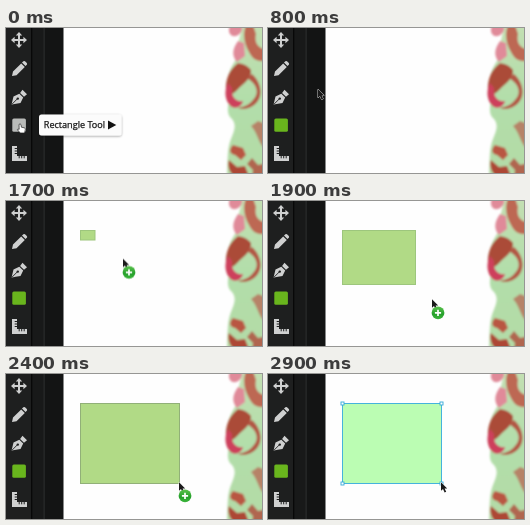
These frames come from a looping animation (256x145 px, 3.9 s). An HTML page:

```html
<!DOCTYPE html>
<html lang="en">
<head>
<meta charset="utf-8">
<title>Rectangle tool</title>
<style>
html, body { margin: 0; width: 100%; height: 100%; overflow: hidden; background: #fff; }
svg { display: block; width: 100vw; height: 100vh; }
text { font: 9.1px "Open Sans", "Noto Sans", sans-serif; fill: #161616; stroke: #161616; stroke-width: .25px; }

.swatch, .hover, .arrow, .badge, .shape, .selection {
  animation: 3.9s step-end infinite;
}
.swatch { animation-name: pick; }
.hover { animation-name: leave; }
.arrow { animation-name: move; }
.badge { animation-name: badge; }
.shape { animation-name: draw; x: 74.5px; y: 29.5px; }
.selection { animation-name: select; }

@keyframes pick {
  0% { fill: #b9bbb9; }
  7.69%, 100% { fill: #69b51d; }
}
@keyframes leave {
  0% { visibility: visible; }
  17.94%, 100% { visibility: hidden; }
}
/* pointer: toolbar, start corner, diagonal drag */
@keyframes move {
  0% { transform: translate(14px, 96px); visibility: hidden; }
  17.94% { transform: translate(27px, 84px); visibility: visible; }
  20.51% { transform: translate(50px, 61px); }
  23.07% { transform: translate(71px, 40px); }
  25.64% { transform: translate(81px, 30px); }
  28.2% { transform: translate(84px, 28px); animation-timing-function: steps(3); }
  35.89% { transform: translate(75px, 29px); }
  41.02% { transform: translate(89px, 38px); }
  43.58% { transform: translate(117px, 57.5px); }
  46.15% { transform: translate(146px, 82px); }
  48.71% { transform: translate(164px, 98px); }
  51.28% { transform: translate(171px, 104px); animation-timing-function: steps(2); }
  56.41%, 100% { transform: translate(173px, 108px); visibility: visible; }
}
@keyframes badge {
  0% { visibility: hidden; }
  38.46% { visibility: visible; }
  64.1%, 100% { visibility: hidden; }
}
@keyframes draw {
  0% { width: 0; height: 0; visibility: hidden; fill: #b1da86; stroke: #9dc67d; }
  43.58% { width: 14.5px; height: 9.5px; visibility: visible; }
  46.15% { width: 43px; height: 29px; }
  48.71% { width: 73px; height: 54px; }
  51.28% { width: 93.5px; height: 72px; stroke: #91b078; animation-timing-function: steps(2); }
  56.41% { width: 99px; height: 80px; fill: #b1da86; stroke: #91b078; }
  66.66%, 100% { width: 99px; height: 80px; visibility: visible; fill: #bbfdb3; stroke: #45b3dc; }
}
@keyframes select {
  0% { visibility: hidden; }
  66.66%, 100% { visibility: visible; }
}
</style>
</head>
<body>
<svg viewBox="0 0 256 145" preserveAspectRatio="none">
  <defs>
    <filter id="soft" x="-20%" y="-10%" width="140%" height="120%"><feGaussianBlur stdDeviation=".9"/></filter>
    <filter id="edge"><feGaussianBlur stdDeviation=".3"/></filter>
    <filter id="shadow" x="-10%" y="-30%" width="120%" height="170%">
      <feDropShadow dx="0" dy=".8" stdDeviation="1.2" flood-opacity=".4"/>
    </filter>
    <linearGradient id="cloth" x1="0" x2="0" y1="0" y2="1">
      <stop stop-color="#c3dfb2"/><stop offset=".5" stop-color="#b2deaa"/><stop offset="1" stop-color="#b4dba6"/>
    </linearGradient>
    <linearGradient id="green" x1="0" x2="0" y1="0" y2="1">
      <stop stop-color="#5cc24d"/><stop offset=".6" stop-color="#25a02b"/><stop offset="1" stop-color="#3db53c"/>
    </linearGradient>
  </defs>

  <rect width="256" height="145" fill="#fefefe"/>

  <!-- picture at the right edge -->
  <g filter="url(#soft)">
    <path d="M237 -3C234 8 231 18 231 30C222 42 220 54 222 64C225 72 219 82 224 89C232 96 228 103 225 111C221 121 222 132 221 148H260V-3Z" fill="url(#cloth)"/>
    <path d="M224 -3C221 5 225 9 230 8C235 6 237 2 236 -3ZM232 13C227 20 225 27 231 34L239 28L238 15Z" fill="#e08a99"/>
    <path d="M240 -3C236 8 239 17 243 24C247 32 252 34 260 33V21C252 21 248 14 250 6L247 -3Z" fill="#bd6753"/>
    <path d="M232 35C224 41 219 51 220 63C222 70 229 65 233 60C239 55 246 49 245 42C241 37 237 36 232 35Z" fill="#ab4b38"/>
    <path d="M222 55C217 65 220 75 226 79C231 81 236 78 237 73C230 74 225 69 226 60Z" fill="#cd405c"/>
    <path d="M241 50C251 56 254 65 247 72C243 77 238 79 232 80C239 83 249 79 253 71C257 63 253 52 246 46Z" fill="#b25744"/>
    <path d="M245 98C251 104 252 113 257 119H260V96L252 93Z" fill="#b68368"/>
    <path d="M227 117C223 121 223 126 229 127L235 132L240 127L237 120Z" fill="#b95643"/>
    <path d="M223 132C221 138 224 145 228 148H243L239 138L231 139Z" fill="#ad4634"/>
    <path d="M246 130L241 136L247 142L246 148H260V135L252 137Z" fill="#b06650"/>
  </g>

  <!-- toolbar -->
  <rect width="57.5" height="145" fill="#131414"/>
  <rect width="25" height="145" fill="#1e1f1f"/>
  <rect x="25" width="1.5" height="145" fill="#080808"/>
  <rect x="26.5" width="11" height="145" fill="#181919"/>
  <rect x="37.5" width="1.2" height="145" fill="#2c2d2d"/>

  <g fill="#cfd0d0" filter="url(#edge)">
    <path d="M13 4L16.2 7.6H14V11H17.4V8.8L21 12L17.4 15.2V13H14V16.4H16.2L13 20L9.8 16.4H12V13H8.6V15.2L5 12L8.6 8.8V11H12V7.6H9.8Z"/>
    <path d="M6 48L7 43.6L15.2 35.4L18.8 39L10.5 47.2ZM16 34.6L17.4 33.2Q18.2 32.6 19 33.3L20.8 35.1Q21.5 36 20.8 36.8L19.5 38.1Z"/>
    <path d="M5.6 76.5L7.5 68.4L13.3 65.7L17.2 69.6L14.5 75.1ZM14.1 64.9L16.5 61.8L21 66.3L18 68.8Z"/>
    <path d="M6.2 76L11.5 70.7" stroke="#1e1f1f" stroke-width=".9"/>
    <circle cx="11.8" cy="70.6" r="1.2" fill="#1e1f1f"/>
    <path d="M6 118H11V128H21V133H6Z"/>
    <path d="M8.7 120.5H11M8.7 123H11M8.7 125.5H11M13.2 128V130.3M15.7 128V130.3M18.2 128V130.3" stroke="#1e1f1f"/>
    <rect class="swatch" x="6.3" y="90.4" width="13.6" height="13.4" rx="1.6"/>
  </g>

  <!-- tooltip and hand -->
  <g class="hover">
    <rect x="33" y="86.5" width="82.5" height="21" rx="2.5" fill="#fbfbfb" filter="url(#shadow)"/>
    <text x="37.8" y="100.2">Rectangle Tool</text>
    <path d="M102 92.5L110.3 97L102 101.5Z" fill="#111"/>
    <path d="M13 96.4Q14.2 95.3 15 96.6L15.4 99.2L18.3 99.8Q19.5 100.2 19.3 101.6L18.6 105H14.3L11.4 101.8Q11.4 100.6 13.2 101.3Z" fill="#fff" stroke="#222" stroke-width=".7"/>
  </g>

  <!-- drawn rectangle -->
  <rect class="shape" stroke-width="1"/>
  <g class="selection" fill="#fff" stroke="#36a9d8" stroke-width=".9">
    <rect x="73" y="28" width="3" height="3"/>
    <rect x="172" y="28" width="3" height="3"/>
    <rect x="73" y="108" width="3" height="3"/>
    <rect x="172" y="108" width="3" height="3"/>
  </g>

  <!-- pointer -->
  <g class="arrow">
    <path d="M0 .3V8.8L2 7L3.6 10.5L5.2 9.8L3.6 6.4H6.2Z" fill="#1a1a1a" stroke="#fff" stroke-width=".8" paint-order="stroke"/>
    <g class="badge">
      <circle cx="6" cy="13.8" r="6.4" fill="url(#green)"/>
      <path d="M6 10.7V16.9M2.9 13.8H9.1" stroke="#fff" stroke-width="1.7"/>
    </g>
  </g>
</svg>
</body>
</html>
```
